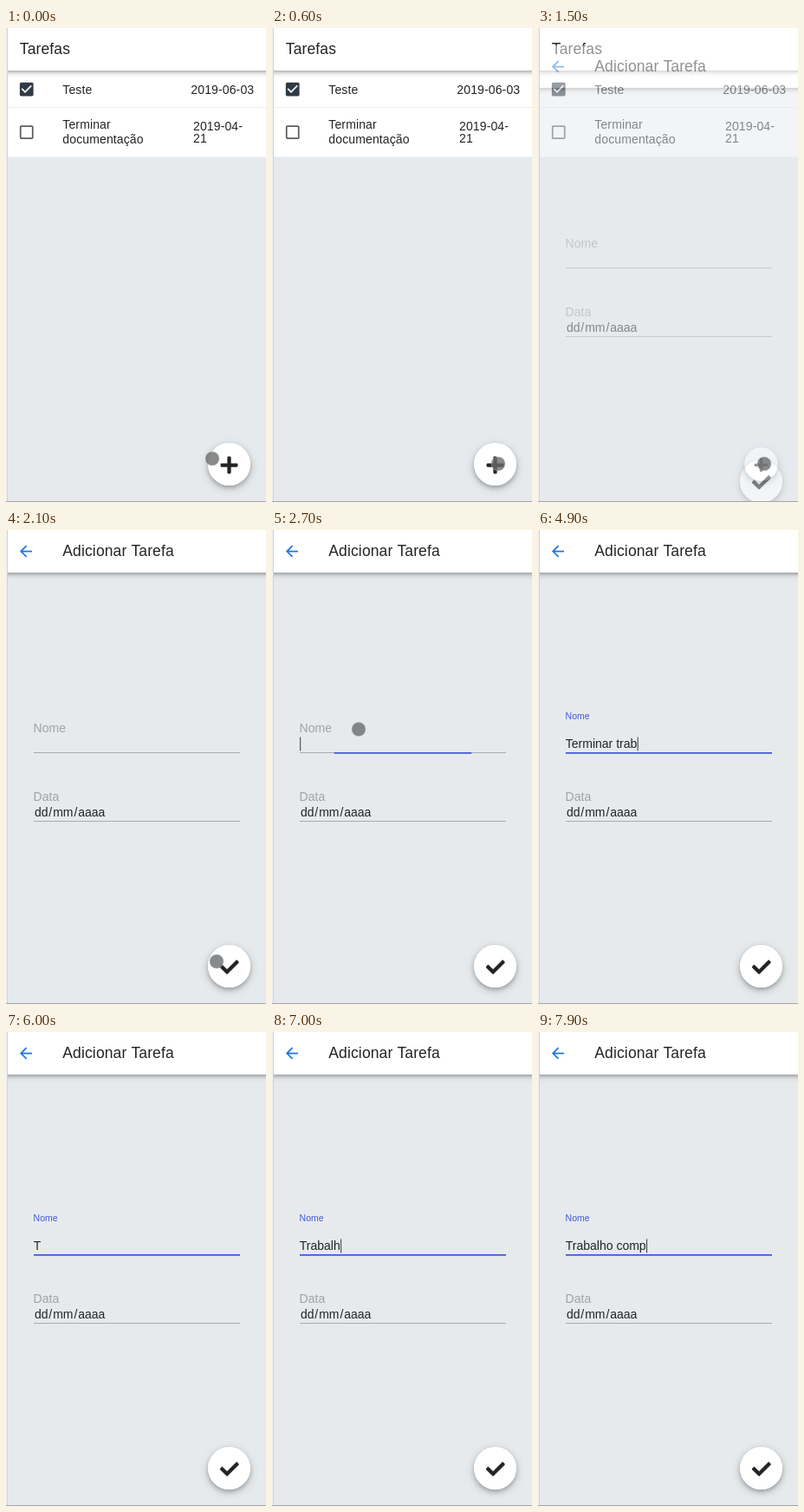
Animation of 300x546 px, one loop 8000 ms. Source, as an HTML page with a canvas:

```html
<!DOCTYPE html>
<html lang="pt">
<head>
<meta charset="utf-8">
<title>Tarefas</title>
<style>
  html, body { margin: 0; width: 100%; height: 100%; overflow: hidden; background: #e6eaed; }
  canvas { display: block; width: 300px; height: 546px; }
</style>
</head>
<body>
<canvas id="stage"></canvas>
<script>
const W = 300, H = 546, LOOP = 8000, STEP = 100;
const BG = '#e6eaed', INK = '#222426', FAINT = 'rgba(0,0,0,0.3)', BLUE = '#4258dc';
const FAB = { x: 257.5, y: 502.5, r: 24.5 };

const canvas = document.getElementById('stage');
const dpr = window.devicePixelRatio || 1;
canvas.width = W * dpr;
canvas.height = H * dpr;
const ctx = canvas.getContext('2d');

const icons = {
  checked: new Path2D('M19 3H5c-1.1 0-2 .9-2 2v14c0 1.1.9 2 2 2h14c1.1 0 2-.9 2-2V5c0-1.1-.9-2-2-2zm-9 14l-5-5 1.4-1.4L10 14.2l7.6-7.6L19 8l-9 9z'),
  empty: new Path2D('M19 5v14H5V5h14m0-2H5c-1.1 0-2 .9-2 2v14c0 1.1.9 2 2 2h14c1.1 0 2-.9 2-2V5c0-1.1-.9-2-2-2z'),
  back: new Path2D('M20 11H7.8l5.6-5.6L12 4l-8 8 8 8 1.4-1.4L7.8 13H20v-2z'),
  tick: new Path2D('M174 439L7.5 273c-10-10-10-26 0-36l36-36c10-10 26-10 36 0L192 313 432 73c10-10 26-10 36 0l36 36c10 10 10 26 0 36L210 439c-10 10-26 10-36 0z'),
};

const clamp = (v) => Math.min(1, Math.max(0, v));
const mix = (a, b, p) => a + (b - a) * p;
const smooth = (t, start, length) => {
  const p = clamp((t - start) / length);
  return p * p * (3 - 2 * p);
};

function text(str, x, y, { size = 14, color = INK, spacing = 0 } = {}) {
  ctx.font = `${size}px "Liberation Sans", Arial, sans-serif`;
  ctx.letterSpacing = `${spacing}px`;
  ctx.fillStyle = color;
  ctx.fillText(str, x, y);
  return ctx.measureText(str).width;
}

function rect(x, y, w, h, color) {
  ctx.fillStyle = color;
  ctx.fillRect(x, y, w, h);
}

function icon(path, cx, cy, scale, half, color) {
  ctx.save();
  ctx.translate(cx, cy);
  ctx.scale(scale, scale);
  ctx.translate(-half, -half);
  ctx.fillStyle = color;
  ctx.fill(path);
  ctx.restore();
}

// Canvas shadows ignore the transform, so scale them by hand.
function shadowed(alpha, blur, dy, draw) {
  ctx.save();
  ctx.shadowColor = `rgba(0,0,0,${alpha})`;
  ctx.shadowBlur = blur * dpr;
  ctx.shadowOffsetY = dy * dpr;
  draw();
  ctx.restore();
}

function header(title, x) {
  const bar = () => rect(-10, 0, W + 20, 49, '#fff');
  shadowed(0.25, 4, 1.5, bar);
  shadowed(0.14, 8, 2, bar);
  text(title, x, 30, { size: 17.5, spacing: 0.13 });
}

function fab(scale, drawIcon) {
  ctx.save();
  ctx.translate(FAB.x, FAB.y);
  ctx.scale(scale, scale);
  const disc = () => {
    ctx.beginPath();
    ctx.arc(0, 0, FAB.r, 0, 7);
    ctx.fillStyle = '#fff';
    ctx.fill();
  };
  shadowed(0.24, 5, 2.6, disc);
  shadowed(0.16, 12, 3, disc);
  drawIcon();
  ctx.restore();
}

function plus() {
  ctx.fillStyle = INK;
  ctx.beginPath();
  ctx.roundRect(-10, -1.1, 20, 4.3, 1.4);
  ctx.roundRect(-2.15, -9, 4.3, 20, 1.4);
  ctx.fill();
}

function listPage(t) {
  const row = { spacing: 0.13 };
  rect(0, 0, W, H, BG);
  rect(0, 0, W, 148.5, '#fff');
  rect(0, 91, W, 1, '#eceeef');
  icon(icons.checked, 23.75, 70.5, 0.875, 12, '#303a45');
  icon(icons.empty, 23.75, 120, 0.875, 12, '#5c5e60');
  text('Teste', 65.3, 75.5, row);
  text('2019-06-03', 213.3, 75.5, row);
  text('Terminar', 65.3, 116, row);
  text('documentação', 65.3, 132.5, row);
  text('2019-04-', 216, 118, row);
  text('21', 216, 132, row);
  header('Tarefas', 15.8);
  fab(mix(1, 0.1, smooth(t, 1430, 220)), plus);
}

// The name being typed, erased and typed again.
const FIRST = 'Terminar traba', SECOND = 'Trabalho comp';
const KEYS = [6200, 6400, 6600, 6700, 6800, 7000, 7100, 7400, 7600, 7600, 7800, 7900];

function typed(t) {
  if (t >= 6000) return SECOND.slice(0, 1 + KEYS.filter((k) => k <= t).length);
  let n = Math.min(10, Math.max(0, (t - 3300) / STEP));
  n += Math.min(4, Math.max(0, (t - 4600) / STEP));
  if (t >= 5300) n = 14 - Math.round(((t - 5200) / STEP) * 13 / 8);
  return FIRST.slice(0, n);
}

const caretOn = (t) => t >= 2600 && !(t >= 3100 && t < 3400) && !(t >= 6000 && t < 6200);

function nameField(t) {
  const p = smooth(t, 3350, 200);
  const color = p > 0.5 ? BLUE : FAINT;
  text('Nome', 31.6, mix(233, 218, p), { size: mix(14, 10.5, p), color });
  rect(32, 256, 238, 0.9, FAINT);
  const half = 119 * smooth(t, 2580, 196);
  rect(151 - half, 256, half * 2, 1.75, BLUE);
  const width = text(typed(t), 31.8, 251);
  if (caretOn(t)) rect(32.2 + width, 238.5, 1, 16, '#3a3c3e');
}

function dateField() {
  text('Data', 31.6, 312, { color: FAINT });
  let x = 32;
  for (const part of ['dd', '/', 'mm', '/', 'aaaa']) {
    const pad = part === '/' ? 0 : 0.9;
    x += pad;
    x += text(part, x, 329.5) + pad;
  }
  rect(32, 335, 238, 0.9, FAINT);
}

function formPage(t) {
  rect(0, 0, W, H, BG);
  header('Adicionar Tarefa', 65.3);
  icon(icons.back, 23, 24.5, 0.875, 12, '#1f76e6');
  nameField(t);
  dateField();
  fab(1, () => icon(icons.tick, 0.3, 1, 22 / 512, 256, INK));
}

// Pointer path: time, x, y
const POINTER = [
  [200, 238, 496], [500, 264, 503], [600, 261, 502], [1600, 261, 502],
  [2000, 243, 497], [2100, 243, 497], [2300, 108, 236], [2400, 108, 236],
  [2600, 100, 229.5],
];

function pointer(t) {
  if (t >= 3400) return;
  let i = POINTER.findIndex((p) => p[0] > t);
  if (i < 0) i = POINTER.length - 1;
  const a = POINTER[Math.max(0, i - 1)], b = POINTER[i];
  const p = clamp((t - a[0]) / (b[0] - a[0]));
  ctx.beginPath();
  ctx.arc(mix(a[1], b[1], p), mix(a[2], b[2], p), 8, 0, 7);
  ctx.fillStyle = 'rgba(105,107,109,0.8)';
  ctx.fill();
  ctx.strokeStyle = 'rgba(190,192,194,0.6)';
  ctx.lineWidth = 0.8;
  ctx.stroke();
}

// The form rises and fades in over the list.
function layerForm(t, p) {
  if (p <= 0) return;
  if (p >= 1) return formPage(t);
  const layer = document.createElement('canvas');
  layer.width = canvas.width;
  layer.height = canvas.height;
  const below = ctx.getImageData(0, 0, canvas.width, canvas.height);
  formPage(t);
  layer.getContext('2d').drawImage(canvas, 0, 0);
  ctx.putImageData(below, 0, 0);
  ctx.globalAlpha = p;
  ctx.drawImage(layer, 0, 40 * (1 - p), W, H);
  ctx.globalAlpha = 1;
}

function enter(t) {
  if (t < 1500) return 0;
  const p = clamp((t - 1440) / 280);
  return 1 - Math.pow(1 - p, 2.9);
}

function render(t) {
  ctx.setTransform(dpr, 0, 0, dpr, 0, 0);
  const p = enter(t);
  if (p < 1) listPage(t);
  layerForm(t, p);
  pointer(t);
  rect(0, 0, 1, H, '#f1f2f3');
  rect(1, 0, 1, H, '#cfd2d4');
  rect(0, 545, W, 1, '#a3a6a8');
}

const began = performance.now();
function tick() {
  const t = (performance.now() - began) % LOOP;
  render(Math.floor(t / STEP) * STEP);
  requestAnimationFrame(tick);
}
tick();
</script>
</body>
</html>
```
